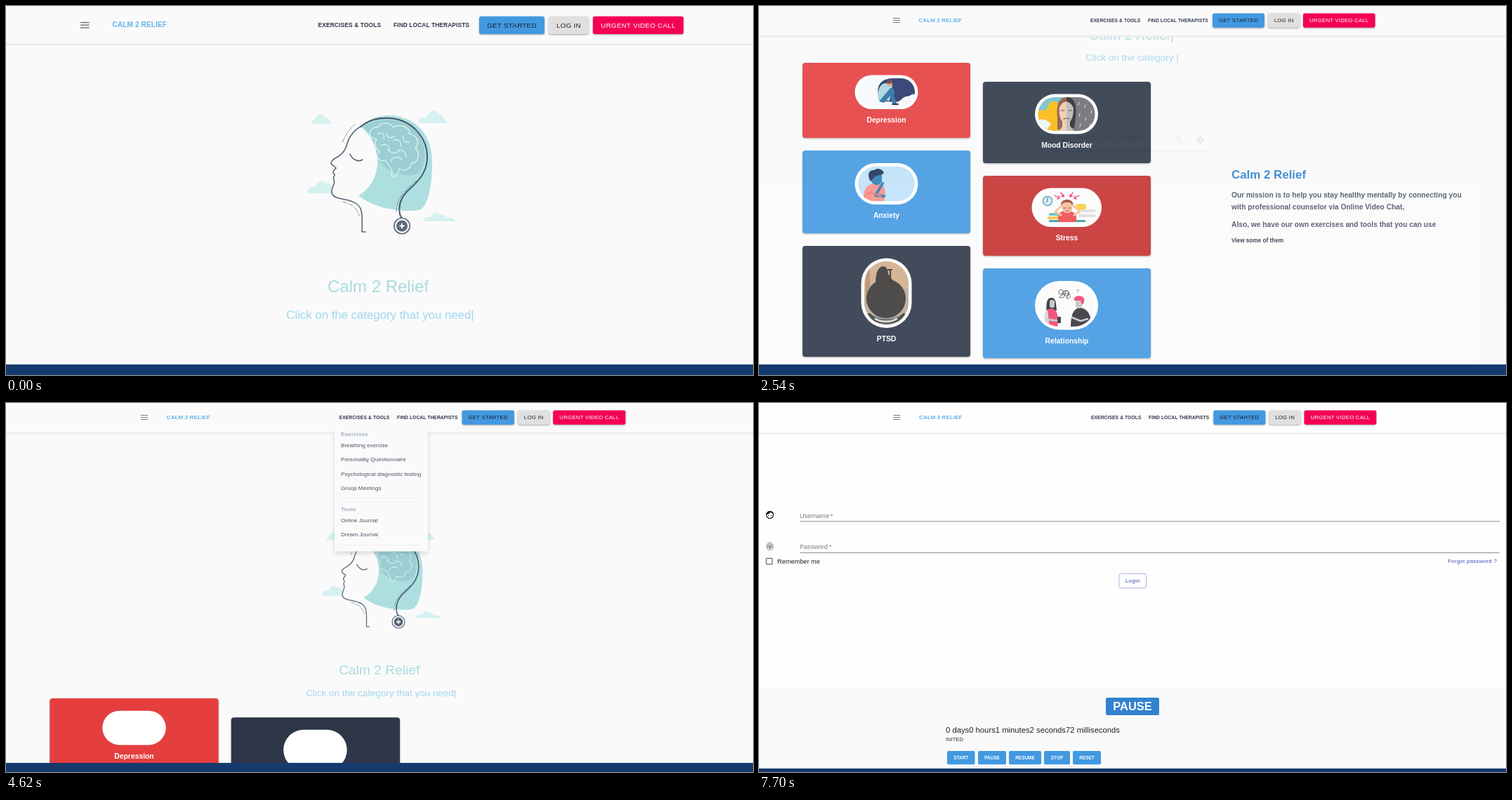
Write an HTML page that moves like this. It is 1064 px wide and 526 px high and loops after 8 s.

```html
<!DOCTYPE html>
<html lang="en">
<head>
<meta charset="utf-8">
<title>Calm 2 Relief</title>
<style>
  html, body { margin: 0; width: 100%; height: 100%; overflow: hidden; background: #153a6e }
  svg { display: block; width: 1064px; height: 526px; font-family: "Liberation Sans", Arial, sans-serif }
  .b { font-weight: bold }
  .m { text-anchor: middle }
  .lift { filter: drop-shadow(0 1px 1px rgba(0,0,0,.35)) }
  .line { fill: none; stroke-linecap: round; stroke-linejoin: round }
</style>
</head>
<body>
<svg id="stage" viewBox="0 0 1064 526"></svg>
<script>
const BRAND = 'Calm 2 Relief';
const INK = '#2d3748', BLUE = '#4299e1', INDIGO = '#3f51b5';

// y is the vertical middle of the capitals
const text = (x, y, size, fill, str, cls = '', spacing = 0) =>
  `<text x="${x}" y="${y + size * .36}" font-size="${size}" fill="${fill}" class="${cls}" letter-spacing="${spacing}">${str}</text>`;
const rect = (x, y, w, h, fill, r = 0, more = '') =>
  `<rect x="${x}" y="${y}" width="${w}" height="${h}" rx="${r}" fill="${fill}" ${more}/>`;
const disc = (x, y, r, fill, more = '') => `<circle cx="${x}" cy="${y}" r="${r}" fill="${fill}" ${more}/>`;
const shape = (d, fill) => `<path d="${d}" fill="${fill}"/>`;
const line = (d, color, width = 1, more = '') =>
  `<path class="line" d="${d}" stroke="${color}" stroke-width="${width}" ${more}/>`;
const group = (transform, body) => `<g transform="${transform}">${body}</g>`;
const page = (fill = '#fafafa') => rect(0, 0, 1064, 526, fill);

function nav(k, cy, xs, bottom, { fill = '#fafafa', find = INK } = {}) {
  const [menu, brand, tools, local, start, login, call] = xs;
  const button = (x, w, color, ink, label) =>
    rect(x, cy - 12.6 * k, w * k, 25.4 * k, color, 3 * k, 'class="lift"') +
    text(x + w * k / 2, cy - .2, 9.8 * k, ink, label, 'm', .28 * k);
  const bars = [-3.8, 0, 3.8].map(d => `M${menu} ${cy + d * k}h${12.5 * k}`).join('');
  return rect(0, 0, 1070, bottom, fill) + rect(0, bottom - .5, 1070, 1, '#dfdfdf') +
    rect(0, bottom + .5, 1070, 1, '#f0f0f0') +
    line(bars, '#777', 1.5 * k, 'style="stroke-linecap:butt"') +
    text(brand, cy - .7 * k, 10.1 * k, '#63b3ed', BRAND.toUpperCase(), 'b', .1 * k) +
    text(tools, cy, 8.4 * k, INK, 'EXERCISES &amp; TOOLS', 'b', .14 * k) +
    text(local, cy, 8.4 * k, find, 'FIND LOCAL THERAPISTS', 'b', .1 * k) +
    button(start, 93, BLUE, '#1a202c', 'GET STARTED') +
    button(login, 57, '#e0e0e0', '#222', 'LOG IN') +
    button(call, 129, '#f50057', '#fff', 'URGENT VIDEO CALL');
}
const smallNav = (bottom, options) =>
  nav(.795, 20.5, [191, 227.5, 472, 554, 646, 725, 775], bottom, options);

function hero() {
  const dark = '#5a697b', cloud = '#d5f1f0';
  return shape('M435 168C436 162 440 164 441 160C444 156 447 152 450 154C453 154 453 160 456 159C460 160 462 163 463 168Z' +
      'M588 167C586 159 592 157 598 160C601 150 612 146 616 153C621 154 624 161 629 167Z' +
      'M429 267C428 260 434 257 440 258C442 249 452 247 455 253C461 251 466 258 466 267Z' +
      'M595 307C595 301 600 299 605 301C608 294 616 293 618 297C623 295 626 300 627 302C634 300 638 303 641 307Z', cloud) +
    shape('M505 172C518 160 530 156 545 156C585 157 607 185 607 222C607 250 603 280 592 289C585 294 560 292 540 288C525 284 511 278 502 270C518 262 529 243 529 222C529 202 520 184 505 172Z', '#aedfe0') +
    shape('M508 172C525 160 560 158 578 172C596 186 601 212 592 232C586 243 570 242 562 240C548 238 532 226 529 216C529 200 520 182 508 172Z', '#9dced2') +
    line('M528 190C514 188 515 172 530 173C535 163 551 168 551 173C566 165 578 178 574 182C589 184 588 200 583 203C592 212 585 226 577 224C577 234 566 236 560 232C559 240 553 247 549 241C552 234 545 226 540 220C528 222 526 212 533 208C526 204 524 194 528 190' +
      'M530 182c6-3 10 2 8 7m4-8c0 8 8 8 12 4m-20 14c6-4 12 0 12 6m6-14c6-2 12 2 10 9m-18 4c4 8 14 6 16 1m6-20c-2 6 2 10 8 9m-26 28c2-8 12-8 16-3m-6-14c8 0 12 4 12 10', '#e4f6f6', 1.2) +
    line('M507 171C498 175 489 185 486 196C484 205 480 210 474 214C467 218 463 220 463 224C464 228 469 228 470 231C468 234 465 235 466 238C468 240 469 241 467 243C465 246 469 249 467 254C463 263 461 271 474 274C490 277 504 280 506 292C508 302 507 312 507 322H512', dark, 1.6) +
    line('M505 172C518 161 535 159 548 160C581 163 600 190 600 215C600 235 590 247 578 258C565 269 558 280 561 297L564 303', '#46566a', 1.9) +
    line('M490 211C493 219 502 223 508 219', dark, 1.6) +
    line('M479 194C484 184 488 176 497 169M480 279C492 282 500 288 503 299M556 293C557 275 564 266 586 248', dark, .8, 'stroke-dasharray="5 2 1 2"') +
    disc(564, 313.5, 11.2, '#fafafa', `stroke="${dark}" stroke-width="1.6"`) +
    disc(564, 313.5, 8, dark) + line('M564 310.5v6M561 313.5h6', '#fff', 1.8) +
    text(530, 399, 24, '#a9dce0', BRAND, 'm') +
    text(533, 440, 16.8, '#9fd6f0', 'Click on the category that you need|', 'm');
}

const art = {
  Depression: shape('M170 128C167 110 176 104 190 103H213C223 106 225 118 222 126C214 124 212 134 202 137L175 136Z', '#26356b') +
    shape('M186 141C194 136 198 138 203 133C210 126 216 130 226 128V147H186Z', '#f4f6fa') +
    shape('M170 135C168 120 172 111 180 110L190 113L186 135Z', '#a9d5df') +
    shape('M171 136L187 117C193 116 194 122 192 128L196 139H190L187 128L178 138Z', '#2a6ea8') +
    disc(186, 110.5, 4, '#e0a083') + shape('M181 110C182 104 192 105 190 110L185 111Z', '#6b3f3a') +
    line('M190 140h8', '#222', 1.8),
  Anxiety: shape('M149 278C148 264 152 256 160 254H174C182 258 180 270 178 278Z', '#fa8f88') +
    shape('M160 238H175V250C172 257 163 257 160 250Z', '#2c7db8') +
    shape('M159 250C153 240 157 233 164 234C168 230 176 232 178 238C174 242 167 241 165 243Z', '#1d3557') +
    line('M178 271L166 270L176 253', '#2c7db8', 4) + line('M151 272C156 262 162 268 174 271', '#f77770', 2),
  PTSD: rect(146, 359, 72, 60, '#cfae8b') + rect(146, 403, 72, 57, '#b9a995') +
    rect(152, 375, 6, 50, '#b58f70') +
    shape('M157 462C154 440 166 436 181 444C200 436 207 446 205 462Z', '#8e8e8e') +
    shape('M166 395C166 380 170 371 177 371C183 372 184 378 184 382L194 396Z', '#3a3836') +
    disc(181, 417, 28, '#3b3937') + line('M187 395V378M184 376h5', '#35312f', 2.2) +
    line('M157 441C168 453 195 453 206 441', '#3f3d3c', 6) + line('M166 446C174 451 188 451 196 446', '#d5d2ce', 3),
  'Mood Disorder': rect(393, 125, 45, 58, '#76c2cc') + rect(438, 125, 46, 58, '#6d6f72') +
    shape('M393 152C402 142 408 158 413 139C418 134 424 136 427 140V183H393Z', '#fbb90e') +
    shape('M393 166C402 158 410 162 416 168C410 178 402 182 393 182Z', '#f1f5f8') +
    shape('M425 158C423 138 429 130 438 130V176H425Z', '#8b5a45') + shape('M438 130C449 130 453 140 451 158L449 174H438Z', '#2c2c2f') +
    shape('M428 145C430 139 434 137 438 136V183H424L432 172V165C428 160 427 152 428 145Z', '#f4c9ab') +
    shape('M438 136C442 137 447 141 448 146C448 156 446 161 443 165V171L453 183H438Z', '#b7b7b7') +
    line('M430 149h5M441 149h5M434 161q4-2 8 0', '#544', 1.2) +
    line('M456 137l-1 4M465 141l-1 4M474 149l-1 4M457 153l-1 4M466 159l-1 4M458 168l-1 4M472 168l-1 4', '#e2e2e2', 1),
  Stress: disc(411, 278, 6.5, '#d7f0f9', 'stroke="#4c9dbd" stroke-width="1.5"') + line('M411 274v4l-2 2', '#345', 1) +
    rect(451, 282, 15, 9, '#f5cf43', 4) + rect(459, 290, 20, 4, '#d9dfe3') + rect(455, 297, 25, 4, '#ddd') +
    rect(413, 295, 15, 4, '#66bfbd', 1) + rect(411, 300, 18, 4, '#f4c542', 1) + rect(413, 305, 52, 3, '#3e97a8', 1) +
    shape('M427 308C424 297 428 293 435 292H443C451 294 454 300 451 308Z', '#ee4c50') +
    rect(432, 278, 14, 17, '#f7bd96', 6) + shape('M430 286C428 273 449 272 448 286L443 280H434Z', '#9c4c36') +
    line('M430 298L422 293L432 284M449 298L457 293L447 284', '#f7bd96', 3) +
    line('M421 270l7 4m-3 1l3-1-1-3M430 266l4 6m-3-1l3 1v-3M447 266l-4 6m3-1l-3 1v-3M456 270l-7 4m3 1l-3-1 1-3', '#f0386b', 1.4) +
    line('M434 288h3M441 288h3M437 292h4', '#734', 1),
  Relationship: line('M428 411c-5-8 8-9 5-2s-9 6-2 7 3-14 8-10-5 12 1 11 3-8-3-7-10 5-4-2 13 4 6 5-8-8-3-6', '#444', .9) +
    text(452, 406, 7, '#666', '?') +
    shape('M410 437C408 422 411 415 417 416C423 416 423 424 424 434Z', '#2e2e35') + rect(414, 419, 7, 11, '#c3c3c7', 3) +
    shape('M408 458C405 440 408 432 417 431C426 433 427 445 425 458Z', '#f44373') +
    shape('M408 456C405 441 407 435 411 433L414 458Z', '#d3d3d6') + line('M411 447L428 449', '#c3c3c7', 3) + rect(425, 443, 5, 9, '#33333b', 1) +
    shape('M444 458C444 440 448 431 457 430C469 431 474 442 473 458Z', '#34343c') +
    rect(451, 417, 9, 14, '#c6c6ca', 4) + shape('M449 420C447 411 462 412 463 417C464 422 462 425 460 426L458 420Z', '#f44373') +
    line('M446 444L458 449L468 446', '#c6c6ca', 2.5),
};

function card(name, [x, y, w, h], color, [px, py, pw, ph], inside) {
  const id = 'pill-' + name[0] + name.length, r = Math.min(pw, ph) / 2;
  const inner = fill => rect(px + 4.5, py + 4.5, pw - 9, ph - 9, fill, r - 4.5);
  return rect(x, y, w, h, color, 4, 'class="lift"') + rect(px, py, pw, ph, '#fff', r) +
    `<clipPath id="${id}">${inner('#000')}</clipPath><g clip-path="url(#${id})">${inner(inside)}${art[name]}</g>` +
    text(x + w / 2, py + ph + 15.7, 10.3, '#fff', name, 'b m');
}
const cards = () =>
  card('Depression', [62, 81, 239, 107], '#e53e3e', [136.5, 98.5, 90, 48.5], '#f8f9fb') +
  card('Anxiety', [62, 206, 239, 118], BLUE, [136.5, 224, 90, 59], '#bfe2fb') +
  card('PTSD', [62, 342, 239, 158], INK, [145.5, 359.5, 72, 99.5], '#cfae8b') +
  card('Mood Disorder', [319, 108, 239, 116], INK, [393, 125.5, 90, 57], '#76c2cc') +
  card('Stress', [319, 242, 239, 114], '#c53030', [388.5, 259.5, 99.5, 55.5], '#fafafa') +
  card('Relationship', [319, 374, 239, 128], BLUE, [393, 392, 90, 69.5], '#fafafa');

const home = () => page() + rect(0, 0, 1064, 1, '#e8e8e8') +
  nav(1, 27.3, [106, 151.5, 444.5, 552, 674, 773, 836], 54.5) + `<g id="hero">${hero()}</g>`;

const categories = () => page() +
  text(470, 41, 19.3, '#a9dce0', BRAND + '|') + text(465, 73, 13.45, '#9fd6f0', 'Click on the category |') +
  smallNav(43) + `<g id="cards">${cards()}</g>` +
  text(673, 240, 16.9, '#3182ce', BRAND, 'b') +
  text(673, 269.5, 10.23, '#4a5568', 'Our mission is to help you stay healthy mentally by connecting you', 'b') +
  text(673, 286, 10.23, '#4a5568', 'with professional counselor via Online Video Chat,', 'b') +
  text(673, 311, 10.23, '#4a5568', 'Also, we have our own exercises and tools that you can use', 'b') +
  text(673, 334.5, 8.2, INK, 'View some of them', 'b');

const search = () => page() + smallNav(42, { find: '#7f8b9c' }) +
  rect(1061.5, 63, 2.5, 367, '#c4c4c4') +
  rect(420, 177, 224, 29, '#fbfbfb', 3, 'class="lift"') +
  line('M431 190l3.2 3.2 3.2-3.2', '#666', 1.4) + text(451, 187, 9.15, '#999', 'Search Local Therapist') +
  disc(597.5, 190, 3.2, 'none', 'stroke="#757575" stroke-width="1.3"') + line('M600 192.5l3.5 3.5', '#757575', 1.5) +
  shape('M628.5 185.5l6 6-6 6-6-6Z', INDIGO) + line('M626.5 193.5v-2.5h4m-1.5-1.7l1.7 1.7-1.7 1.7', '#fff', 1);

function menu() {
  const item = (y, str) => text(477, y, 8.1, '#4a5568', str);
  const heading = (y, str) => text(477, y, 7.9, '#a0aec0', str, 'b', .2);
  return page() + `<use href="#hero" transform="translate(107.8 61.2) scale(.8)"/>` +
    `<use href="#cards" transform="translate(0 339.6) scale(1.0055)"/>` +
    group('scale(1.0055 1)', smallNav(43)) +
    rect(468, 38, 133, 173.5, '#fafafa', 0, 'style="filter:drop-shadow(0 3px 3px rgba(0,0,0,.14))"') +
    rect(466, 30, 137, 12, '#fafafa') +
    heading(44.5, 'Exercises') + item(60.5, 'Breathing exercise') + item(80.5, 'Personality Questionnaire') +
    item(100.7, 'Psychological diagnostic testing') + item(121, 'Gruop Meetings') + rect(477, 135, 115, 1, '#efefef') +
    heading(151.3, 'Tools') + item(167, 'Online Journal') + item(187.3, 'Dream Journal') + rect(477, 202, 115, 1, '#efefef');
}

function timer() {
  const button = ([x, w, label]) => rect(x, 496, w, 19.3, BLUE, 2) + text(x + w / 2, 505.7, 6.3, '#fff', label, 'b m', .1);
  return rect(494, 420, 76, 25, '#3182ce', 2.5) + text(532, 432.5, 16.4, '#fff', 'PAUSE', 'b m') +
    text(266, 466, 11.27, '#222', '0 days0 hours1 minutes2 seconds72 milliseconds') + text(266, 479, 7.6, '#333', 'INITED') +
    [[268, 39.5, 'START'], [312, 40, 'PAUSE'], [356, 46, 'RESUME'], [406, 37, 'STOP'], [447, 40, 'RESET']].map(button).join('');
}
const breathing = () => page('#f8f9fa') + group('translate(4.65 2.7) scale(.9913 1)', smallNav(42.5)) +
  rect(272, 46, 520, 357, '#f6f7f7') + disc(530.7, 220, 149, '#40759c') + disc(530.7, 220, 103, '#a3c9ed') +
  `<text x="530.5" y="229" class="m" font-size="29.5" fill="#1f4a68" stroke="#1f4a68" stroke-width=".5" font-family="Lato, sans-serif">Exhale</text>` + timer();

function signIn() {
  const field = (y, label) => text(58, y, 9.1, '#777', label + '&#8201;*') + rect(58, y + 8, 997, 1, '#8f8f8f');
  const ridges = [1.2, 2.8, 4.4].map(r => `M${15.5 - r} 207v-3a${r} ${r * 1.15} 0 0 1 ${2 * r} 0v3`).join('');
  return page('#f8f9fa') + rect(0, 0, 1064, 406.5, '#fefefe') + group('scale(1.002 1)', smallNav(43, { fill: '#fefefe' })) +
    disc(15.5, 159.5, 5, 'none', 'stroke="#222" stroke-width="1.3"') + shape('M10.5 159C14 159 15 157 16 156L21 158C20 153 11 152 10.5 159Z', '#222') +
    disc(13.6, 160.5, .8, '#222') + disc(17.4, 160.5, .8, '#222') + field(160.3, 'Username') +
    line(ridges + 'M12 208.5l2 1M17 209.5l2-1M15.5 204v5', '#777', .9) + field(205, 'Password') +
    rect(10.3, 221.3, 8.6, 8.6, 'none', 1, 'stroke="#666" stroke-width="1.2"') + text(26, 225.7, 9.2, '#222', 'Remember me') +
    text(981, 225.5, 8, INDIGO, 'Forgot password ?', '', .23) +
    rect(513, 243.3, 38.5, 20.4, 'none', 2.5, 'stroke="#adb5de"') + text(532.3, 253.3, 8, INDIGO, 'Login', 'm', .23) + timer();
}

const stage = document.getElementById('stage');
const heights = [511, 511, 511, 513, 521, 521];
stage.innerHTML = [home, categories, search, menu, breathing, signIn].map(draw => `<g class="scene">${draw()}</g>`).join('') +
  rect(0, 511, 1064, 20, '#153a6e', 0, 'id="bar"');
const scenes = stage.querySelectorAll('.scene'), bar = document.getElementById('bar');

const HOLD = 1000, CYCLE = 1540, STEP = 60, LOOP = 8000;
function render(now) {
  const t = now % LOOP - HOLD;
  const current = Math.floor(t / CYCLE) + 1;
  const mix = t < 0 ? 1 : Math.min(1, (Math.floor(t % CYCLE / STEP) + 1) / 10);
  scenes.forEach((scene, i) => {
    const shown = i === current ? mix : +(i === current - 1 && mix < 1);
    scene.style.opacity = shown;
    scene.style.visibility = shown ? 'visible' : 'hidden';
  });
  bar.setAttribute('y', heights[mix < 1 ? current - 1 : current]);
}

const start = performance.now();
(function tick() {
  render(performance.now() - start);
  requestAnimationFrame(tick);
})();
</script>
</body>
</html>
```
